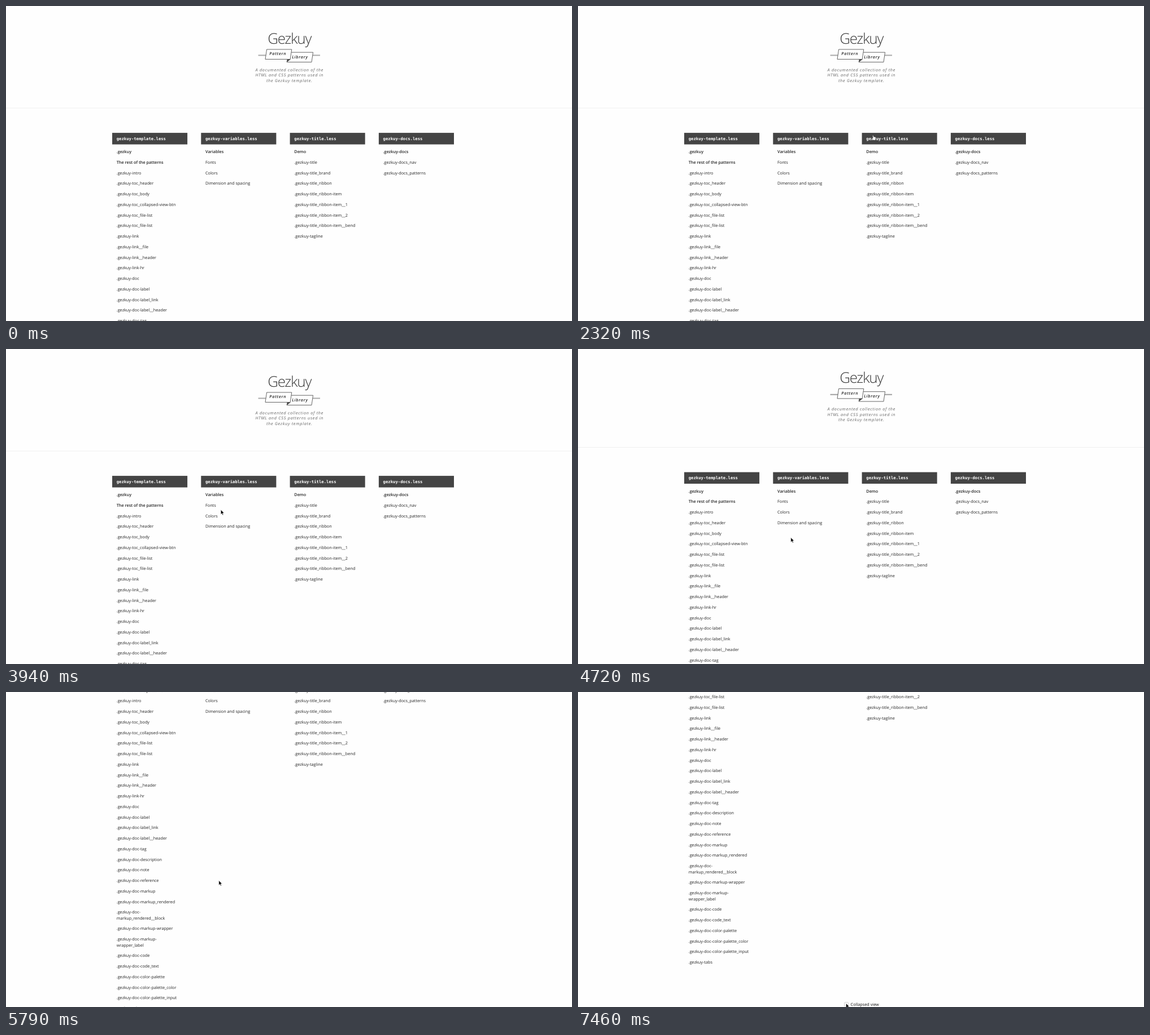
Write an HTML page that moves like this. It is 1002 px wide and 559 px high and loops after 8 s.

```html
<!DOCTYPE html>
<html lang="en">
<head>
<meta charset="utf-8">
<title>Pattern Library</title>
<style>
  html, body { margin: 0; height: 100%; overflow: hidden; background: #fefefe; }
  svg { display: block; width: 100vw; height: 100vh; }
  text { font: 7.29px "Open Sans", sans-serif; fill: #242424; text-rendering: geometricPrecision; }
  .strong { font-weight: 600; }
  .file { font: bold 7.25px "DejaVu Sans Mono", monospace; fill: #fff; }
  .brand { font-size: 26px; font-weight: 300; letter-spacing: -1.3px; fill: #383838; text-anchor: middle; }
  .ribbon { font-style: italic; font-weight: 600; letter-spacing: .73px; }
  .tagline { font-style: italic; letter-spacing: .73px; fill: #666; text-anchor: middle; }
  .label { fill: #111; }
  .flag { fill: #fefefe; stroke: #555; stroke-width: .9; }
</style>
</head>
<body>
<svg viewBox="0 0 1002 559">
  <g id="page">
    <path d="M446.5 87.5H461M543 87.5H556" stroke="#aaa" stroke-width="2.2"/>
    <path class="flag" d="M500 82.2H543.6L541 99.6H497.2Z"/>
    <path d="M498.3 94.5H504L497 99.8Z" fill="#444"/>
    <path class="flag" d="M461.6 77H505.8L503.2 94.5H459Z"/>
    <rect y="180.6" width="1002" height=".9" fill="#efefef"/>
    <rect x="471.7" y="913.3" width="6.8" height="6.8" rx="1.2" fill="#fff" stroke="#bbb" stroke-width=".7"/>
  </g>
  <g id="cursor" stroke="#fff" stroke-width=".6" stroke-linejoin="round">
    <path id="arrow" d="M0 0V8.3L1.9 6.6 3.2 9.6 4.6 9 3.3 6.1H5.9Z"/>
    <path id="hand" fill="#fff" stroke="#222" d="M1.2.7Q2-.2 2.7.7L3.4 3.1Q4.2 2.5 4.7 3.3 5.5 2.8 5.9 3.6 6.9 3.3 7.1 4.3L7 6.8 6.1 9.2H2.6L.1 6Q-.4 4.9.7 4.9L1.9 5.7Z"/>
  </g>
</svg>
<script>
const LOOP = 8000, NAME = 'gezkuy', ROW = 18.75, LINE = 10.4;
const HEADER = { x: 188, y: 225.1, width: 133.1, height: 20.5, pitch: 157.3 };
const $ = id => document.getElementById(id);

function add(tag, attrs, content = '') {
  const node = document.createElementNS('http://www.w3.org/2000/svg', tag);
  for (const key in attrs) node.setAttribute(key, attrs[key]);
  node.textContent = content;
  return $('page').appendChild(node);
}
const write = (content, x, y, type = '') => add('text', { x, y, class: type }, content);

write('Gezkuy', 501.6, 66.6, 'brand');
write('Pattern', 466.3, 87.4, 'ribbon');
write('Library', 506.2, 92.8, 'ribbon');
['A documented collection of the', 'HTML and CSS patterns used in', 'the Gezkuy template.']
  .forEach((line, i) => write(line, 501.8, 115.5 + i * 9.6, 'tagline'));
write('Collapsed view', 482.6, 919.2, 'label');

// "~" is the class prefix, "*" marks a heading, "/" breaks a line
const columns = {
  template: '*~,*The rest of the patterns,~-intro,~-toc_header,~-toc_body,~-toc_collapsed-view-btn,' +
    '~-toc_file-list,~-toc_file-list,~-link,~-link__file,~-link__header,~-link-hr,~-doc,~-doc-label,' +
    '~-doc-label_link,~-doc-label__header,~-doc-tag,~-doc-description,~-doc-note,~-doc-reference,' +
    '~-doc-markup,~-doc-markup_rendered,~-doc-/markup_rendered__block,~-doc-markup-wrapper,' +
    '~-doc-markup-/wrapper_label,~-doc-code,~-doc-code_text,~-doc-color-palette,' +
    '~-doc-color-palette_color,~-doc-color-palette_input,~-tabs',
  variables: '*Variables,Fonts,Colors,Dimension and spacing',
  title: '*Demo,~-title,~-title_brand,~-title_ribbon,~-title_ribbon-item,~-title_ribbon-item__1,' +
    '~-title_ribbon-item__2,~-title_ribbon-item__bend,~-tagline',
  docs: '*~-docs,~-docs_nav,~-docs_patterns'
};

const headers = Object.entries(columns).map(([file, items], i) => {
  const { y: top, width, height } = HEADER;
  const left = HEADER.x + i * HEADER.pitch, x = left + 7.7;
  const header = add('rect', { x: left, y: top, width, height });
  write(`${NAME}-${file}.less`, x, 237.6, 'file');
  let y = 261.2;
  for (const item of items.split(',')) {
    const type = item[0] === '*' ? 'strong' : '';
    item.replace('*', '').replace('~', '.' + NAME).split('/').forEach((line, n) => {
      if (n) y += LINE;
      write(line, x, y, type);
    });
    y += ROW;
  }
  return header;
});

const moves = [
  { from: 170, to: 170, x: 214, y: 39.5 },
  { from: 470, to: 470, x: 202, y: 46 },
  { from: 1250, to: 1690, x: 444.5, y: 203.5 },
  { from: 1990, to: 2330, x: 558, y: 233 },
  { from: 2500, to: 3020, x: 445, y: 231.5 },
  { from: 3200, to: 3590, x: 382, y: 236 },
  { from: 3790, to: 4180, x: 376.8, y: 334.5 },
  { from: 6540, to: 6960, x: 473.6, y: 550.6 },
  { from: 7170, to: 7460, x: 474.5, y: 552.5 }
];

// Each move runs in even steps along a slightly bowed path.
function pointerAt(t) {
  const i = moves.findLastIndex(move => move.from <= t);
  if (i < 0) return null;
  const { from, to, x, y } = moves[i], start = moves[i - 1] || moves[i];
  const gaps = Math.round((to - from) / 170);
  const done = gaps ? Math.floor((t - from) / (to - from) * gaps) : 0;
  const p = Math.min(1, (done + 1) / (gaps + 1));
  return {
    x: start.x + (x - start.x) * p,
    y: start.y + (y - start.y) * Math.sin(p * Math.PI / 2)
  };
}

// The page decelerates past its end, then springs back.
function scrollAt(t) {
  if (t < 4720) return 0;
  if (t >= 6540) return 362.5;
  const step = t < 5230 ? 255 : 275;
  const tick = 5230 + Math.floor((t - 5230) / step) * step;
  return 368 * (1 - (1 - (tick - 4698) / 1632) ** 1.32);
}

function headerAt(t) {
  const point = pointerAt(t);
  if (!point) return -1;
  const dx = point.x - HEADER.x, dy = point.y + scrollAt(t) - HEADER.y;
  const column = Math.floor(dx / HEADER.pitch);
  const inside = dy >= 0 && dy < HEADER.height && dx - column * HEADER.pitch < HEADER.width;
  return inside ? column : -1;
}

function draw(now) {
  const t = now % LOOP, point = pointerAt(t);
  const over = headerAt(t), lit = headerAt(t - 300) === over ? over : -1;
  $('page').setAttribute('transform', `translate(0 ${-scrollAt(t)})`);
  headers.forEach((header, i) => header.setAttribute('fill', i === lit ? '#5c5c5c' : '#444'));
  $('cursor').style.display = point ? '' : 'none';
  if (point) $('cursor').setAttribute('transform', `translate(${point.x} ${point.y})`);
  $('arrow').style.display = over < 0 ? '' : 'none';
  $('hand').style.display = over < 0 ? 'none' : '';
  requestAnimationFrame(draw);
}
requestAnimationFrame(draw);
</script>
</body>
</html>
```
